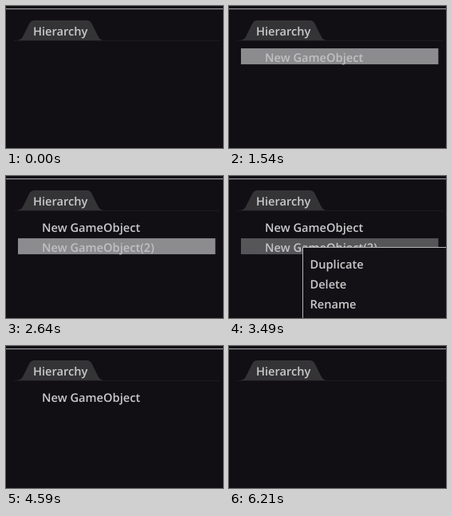
An HTML page that plays this animation: 272 by 178 pixels, repeating every 7.3 s.

```html
<!DOCTYPE html>
<html lang="en">
<head>
<meta charset="utf-8">
<title>Hierarchy panel</title>
<style>
  html, body { margin: 0; width: 100%; height: 100%; overflow: hidden; background: #110f14; }
  svg { display: block; width: 272px; height: 178px; }
  text {
    font: 600 14.65px "Open Sans", "Noto Sans", sans-serif;
    text-rendering: geometricPrecision;
    fill: #cacaca;
  }
  .box { fill: #131116; stroke: #b4b4b6; }
  .glow { fill: #bdbdbf; opacity: 0; }

  /* one 7.3 s loop, hard changes only */
  .t { animation: 7.3s step-end infinite; }
  .show { visibility: hidden; }

  .create { animation-name: create; }
  @keyframes create {
    2.054% { visibility: visible; }
    10.410%, 100% { visibility: hidden; }
  }
  .create-glow { animation-name: create-glow; }
  @keyframes create-glow {
    5.205% { opacity: .72; }
    10.410%, 100% { opacity: 0; }
  }

  .first { animation-name: first; }
  @keyframes first {
    11.643% { visibility: visible; }
    85.068%, 100% { visibility: hidden; }
  }
  .first-glow { animation-name: first-glow; }
  @keyframes first-glow {
    21.095% { opacity: .72; }
    25.479% { opacity: .4; }
    35.068% { opacity: 0; }
    71.506% { opacity: .72; }
    73.561% { opacity: .4; }
    85.068%, 100% { opacity: 0; }
  }

  .second { animation-name: second; }
  @keyframes second {
    36.164% { visibility: visible; }
    62.876%, 100% { visibility: hidden; }
  }
  .second-glow { animation-name: second-glow; }
  @keyframes second-glow {
    36.164% { opacity: .72; }
    47.808% { opacity: .4; }
    62.876%, 100% { opacity: 0; }
  }

  .menu { animation-name: menu; }
  @keyframes menu {
    0% { visibility: hidden; transform: translate(92px, 71px); }
    25.479% { visibility: visible; transform: translate(92px, 71px); }
    35.068% { visibility: hidden; transform: translate(92px, 89px); }
    47.808% { visibility: visible; transform: translate(92px, 89px); }
    62.876% { visibility: hidden; transform: translate(108px, 71px); }
    73.561% { visibility: visible; transform: translate(108px, 71px); }
    85.068%, 100% { visibility: hidden; transform: translate(92px, 71px); }
  }
  .menu-glow { animation-name: menu-glow; }
  @keyframes menu-glow {
    0% { opacity: 0; transform: translateY(0); }
    29.862% { opacity: .72; transform: translateY(0); }
    35.068% { opacity: 0; transform: translateY(0); }
    55.342% { opacity: .72; transform: translateY(0); }
    58.493% { opacity: .72; transform: translateY(25px); }
    62.876% { opacity: 0; transform: translateY(0); }
    77.808% { opacity: .72; transform: translateY(0); }
    78.630% { opacity: .72; transform: translateY(25px); }
    85.068%, 100% { opacity: 0; transform: translateY(0); }
  }
</style>
</head>
<body>
<svg viewBox="0 0 272 178">
  <rect width="272" height="178" fill="#110f14"/>
  <rect y="3" width="272" height="1.2" fill="#98979a"/>

  <path d="M10 43.5H268" stroke="#1d1b20"/>
  <path d="M12 43C18.500 43 19.800 41 22.300 36L29.300 22Q31.300 18 36 18H101.500Q105.500 18 107.500 22L114.500 36C117 41 118.500 43 123.500 43Z" fill="#343336"/>
  <text x="33.9" y="36.500">Hierarchy</text>

  <text class="t show first" x="45.1" y="70.200">New GameObject</text>
  <text class="t show second" x="45.1" y="95.200">New GameObject(2)</text>
  <rect class="t glow first-glow" x="15" y="53.100" width="247.400" height="20"/>
  <rect class="t glow second-glow" x="15" y="78.100" width="247.400" height="20"/>

  <g transform="translate(63 100)">
    <g class="t show create">
      <rect class="box" x=".5" y=".5" width="195" height="40"/>
      <text x="10.4" y="27.700">Create New GameObject</text>
      <rect class="t glow create-glow" x="5.4" y="7.400" width="185.200" height="25.200"/>
    </g>
  </g>

  <g class="t show menu">
    <rect class="box" x=".5" y=".5" width="195" height="116"/>
    <text x="9.4" y="26.700">Duplicate</text>
    <text x="9.4" y="51.700">Delete</text>
    <text x="9.4" y="76.700">Rename</text>
    <text x="9.4" y="101.700">Create Child</text>
    <rect class="t glow menu-glow" x="4.4" y="6.400" width="186" height="25.200"/>
  </g>
</svg>
</body>
</html>
```
